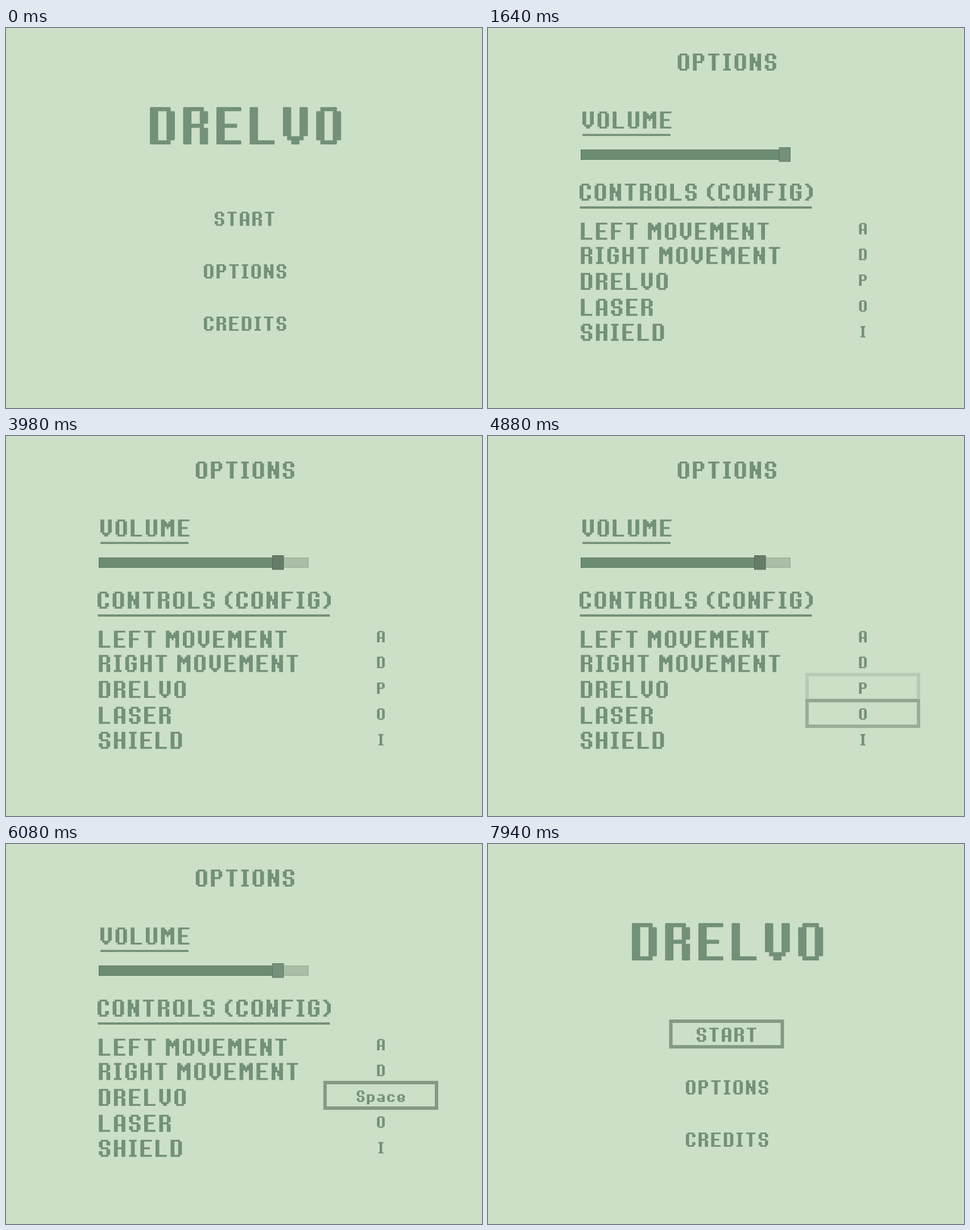
These frames come from a looping animation (837x669 px, 8 s). An HTML page with a canvas:

```html
<!DOCTYPE html>
<html lang="en">
<head>
<meta charset="utf-8">
<title>Game menu</title>
<style>
  html, body { margin: 0; width: 100%; height: 100%; overflow: hidden; background: #cce0c7; }
  canvas { display: block; }
</style>
</head>
<body>
<canvas id="stage" width="837" height="669" role="img" aria-label="Game menu">
  DRELVO: Start, Options, Credits. Options: Volume, Controls (Config).
</canvas>
<script>
const canvas = document.getElementById('stage');
const ctx = canvas.getContext('2d');
const LOOP = 8000, STEP = 60, PHASE = 20, FADE = 85;
const BG = '#cce0c7', INK = '#739079', FRAME = '#839a83';

// Letters are built like a segment display on a grid 6 wide and 9 high
const bar = (y, x = 1, w = 4) => [x, y, w, 1];
const post = (x, y = 0, h = 9) => [x, y, 2, h];
const segments = {
  t: bar(0), m: bar(4), a: bar(5), v: bar(7), b: bar(8),
  T: bar(0, 0, 6), B: bar(8, 0, 6), g: bar(4, 3, 3), y: bar(8, 2, 2),
  s: post(0), c: post(2), S: post(4), w: post(5),
  '[': post(0, 1, 7), ']': post(4, 1, 7),
  u: post(0, 0, 7), U: post(4, 0, 7),
  l: post(0, 1, 3), r: post(4, 1, 3), L: post(0, 5, 3), R: post(4, 5, 3),
  h: post(4, 1, 2), j: post(4, 6, 2), k: post(0, 6, 2),
  f: post(0, 8, 1), F: post(4, 8, 1), d: post(0, 8, 5),
  x: [2, 1, 1, 3], X: [4, 1, 1, 3], z: [3, 2, 1, 3], n: [2, 2, 1, 3], N: [3, 4, 1, 3]
};
const letters = {
  A: 't[]afF', C: 't[bhj', D: 'st]b', E: 'sTmB', F: 'sTm', G: 't[bhgR', H: 'sSm',
  I: 'tcb', L: 'sB', M: 'swxXz', N: 'sSnN', O: 't[]b', P: 'strm', R: 'strmRF',
  S: 'tlhmRkb', T: 'Tc', U: 'uU[]b', V: 'uUvy',
  a: 't]mLbF', c: 't[bhj', e: 't[rmbj', p: 'st]bd', ' ': ''
};
const widths = { I: 4, M: 7, '(': 4, ')': 4, ' ': 1.5 };
const widthOf = ch => widths[ch] || 6;
const measure = str => [...str].reduce((sum, ch) => sum + widthOf(ch) + 2, -2);

// Small letters squeeze the same segments below the middle of the grid
function squeeze([x, y, w, h]) {
  const low = v => Math.round(3 + v * 5 / 8);
  return [x, low(y), w, Math.max(1, low(y + h) - low(y))];
}

function paren(open) {
  return Array.from({ length: 9 }, (_, y) => {
    const bend = Math.min(2, y, 8 - y);
    return [open ? 2 - bend : bend, y, 2, 1];
  });
}

function shapeOf(ch) {
  if (ch === '(' || ch === ')') return paren(ch === '(');
  const parts = [...letters[ch]].map(key => segments[key]);
  return /[a-z]/.test(ch) ? parts.map(squeeze) : parts;
}

function write(str, x, y, u, round = 0) {
  ctx.fillStyle = INK;
  ctx.beginPath();
  for (const ch of str) {
    const shift = ch === 'I' ? -1 : 0;
    for (const [gx, gy, w, h] of shapeOf(ch))
      ctx.roundRect(x + (gx + shift) * u, y + gy * u, w * u, h * u, round);
    x += (widthOf(ch) + 2) * u;
  }
  ctx.fill();
}

const writeCentered = (str, cx, y, u) => write(str, cx - measure(str) * u / 2, y, u);

function fillBox(x, y, w, h, fill, edge) {
  ctx.fillStyle = edge;
  ctx.fillRect(x, y, w, h);
  ctx.fillStyle = fill;
  ctx.fillRect(x + 1, y + 1, w - 2, h - 2);
}

// How far a fade that begins at a given time has come, 0 to 1
const ramp = (t, at) => Math.min(1, Math.max(0, (t - at) / FADE));
const shown = (t, on, off = Infinity) => ramp(t, on) - ramp(t, off);
const ease = p => (1 - Math.cos(Math.PI * p)) / 2;

function follow(points, t) {
  let [t0, x0] = points[0];
  for (const [t1, x1] of points) {
    if (t < t1) return x0 + (x1 - x0) * ease(Math.max(0, (t - t0) / (t1 - t0)));
    [t0, x0] = [t1, x1];
  }
  return x0;
}

function highlight(x, y, alpha) {
  if (alpha <= 0) return;
  const base = ctx.globalAlpha;
  ctx.globalAlpha = base * alpha;
  ctx.strokeStyle = FRAME;
  ctx.lineWidth = 6;
  ctx.strokeRect(x + 3, y + 3, 196, 45);
  ctx.globalAlpha = base;
}

function drawMenu(t) {
  write('DRELVO', 253, 139.3, 7.31, 1.5);
  write('START', 367, 323.5, 2.76);
  write('OPTIONS', 348, 416, 2.78);
  write('CREDITS', 348, 508, 2.78);
  const away = shown(t, 740, 1010);
  highlight(318.5, 309, away + shown(t, 7820));
  highlight(318.5, 402, shown(t, 440, 7820) - away);
}

function drawSlider(t) {
  const x = follow([[2840, 511.5], [2900, 509], [3320, 401], [3680, 491], [3740, 491], [3980, 468]], t);
  const held = t >= 2900 && t < 5480;
  fillBox(163, 214, 369, 18, '#a9bea5', '#93aa92');
  fillBox(163, 214, x - 162, 18, '#6c8c72', '#56735d');
  fillBox(x, 210, 20.5, 25.5, held ? '#667c68' : '#75907b', held ? '#536b57' : '#5b7862');
}

function drawOptions(t) {
  write('OPTIONS', 333.7, 45, 3.33);
  write('VOLUME', 166, 147, 3.33);
  write('CONTROLS (CONFIG)', 161, 274, 3.32);
  ctx.fillRect(166, 186.5, 155, 3.6);
  ctx.fillRect(161.5, 314, 408, 4);
  drawSlider(t);

  write('LEFT MOVEMENT', 163.3, 342.8, 3.32);
  write('RIGHT MOVEMENT', 163.3, 385.5, 3.32);
  write('DRELVO', 163.3, 431.2, 3.32);
  write('LASER', 163.3, 476.8, 3.32);
  write('SHIELD', 163.3, 520.8, 3.32);

  const keys = ['A', 'D', t < 6080 ? 'P' : 'Space', 'O', 'I'];
  keys.forEach((key, i) => writeCentered(key, 659.2, 343.2 + i * 45.4, 2.23));

  // The pointer crosses the second row on its way in and out
  const away = shown(t, 4820, 5060);
  highlight(558, 372, shown(t, 4280, 4305) + shown(t, 6440, 6465));
  highlight(558, 417, shown(t, 4290, 6440) - away);
  highlight(558, 463, away);
}

function layer(draw, alpha, t) {
  if (alpha <= 0) return;
  ctx.globalAlpha = alpha;
  draw(t);
  ctx.globalAlpha = 1;
}

const begin = performance.now();
function tick(now) {
  const time = Math.max(0, now - begin) % LOOP;
  const t = Math.floor((time - PHASE) / STEP) * STEP + PHASE;
  const options = shown(t, 1520, 7040);
  const waiting = t < 6080 ? ramp(t, 5360) : 0;
  ctx.fillStyle = BG;
  ctx.fillRect(0, 0, 837, 669);
  layer(drawMenu, 1 - options, t);
  layer(drawOptions, options * (1 - 0.75 * waiting), t);
  requestAnimationFrame(tick);
}
tick(begin);
</script>
</body>
</html>
```
